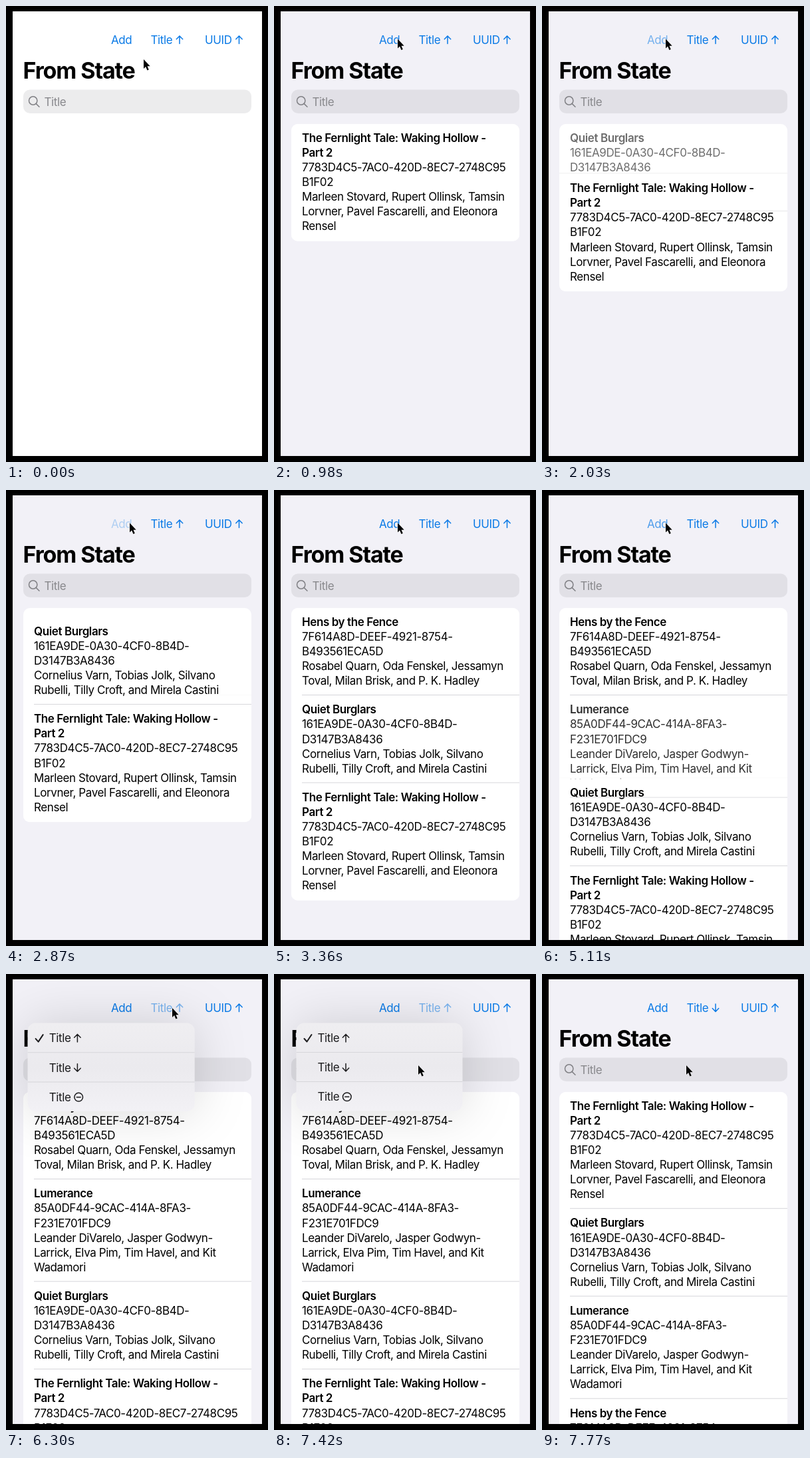
An HTML page that plays this animation: 394 by 684 pixels, repeating every 8000 ms.

```html
<!DOCTYPE html>
<html lang="en">
<head>
<meta charset="utf-8">
<title>Sortable list</title>
<style>
  html, body { margin: 0; width: 100%; height: 100%; overflow: hidden; background: #000; }
  svg { display: block; width: 394px; height: 684px; }
  text { font: 17px Inter, "Liberation Sans", sans-serif; letter-spacing: -.41px; font-optical-sizing: none; white-space: pre; }
  .heading { font-size: 34px; font-weight: 700; letter-spacing: -1.1px; }
  .name { font-weight: 600; }
  .hint { fill: #88888c; }
  .icon { fill: none; stroke: currentColor; stroke-width: 1.5; stroke-linecap: round; stroke-linejoin: round; }
  .label { fill: currentColor; }
  #bar { color: #0a7ae6; }
  #menu { color: #1c1c1e; }
  .panel { filter: drop-shadow(0 0 38px rgba(0, 0, 0, .15)); }
  .rule { stroke: #d6d6da; }
</style>
</head>
<body>
<svg viewBox="0 0 394 684">
  <defs>
    <clipPath id="screenClip"><rect x="10" y="8" width="375" height="667"/></clipPath>
    <clipPath id="cardClip"><rect class="card" x="26" y="177" width="343" rx="10"/></clipPath>
    <linearGradient id="glass" x2="0" y2="1">
      <stop stop-color="#efeef1"/><stop offset=".5" stop-color="#ebeaee"/><stop offset="1" stop-color="#f2f1f5"/>
    </linearGradient>
  </defs>
  <g clip-path="url(#screenClip)">
    <rect width="394" height="684" fill="#fff"/>
    <rect id="tint" width="394" height="684" fill="#f2f1f7"/>
    <text class="heading" x="25.5" y="108.5">From State</text>
    <rect x="26" y="125.5" width="343" height="35.5" rx="10" fill="#767680" fill-opacity=".14"/>
    <g class="icon" color="#808085"><circle cx="40.7" cy="142" r="6.2"/><path d="M45.3 146.6l4.7 4.6"/></g>
    <text class="hint" x="57.5" y="150">Title</text>
    <g id="list" clip-path="url(#cardClip)">
      <rect class="card" x="26" y="177" width="343" fill="#fff"/>
      <g id="rows"></g>
      <g id="rules"></g>
    </g>
    <g id="bar"></g>
    <g id="menu">
      <rect class="panel" x="33.5" y="73.5" width="250" height="132" rx="12" fill="url(#glass)"/>
      <path class="rule" d="M33.5 117.5h250M33.5 161.5h250"/>
      <path class="icon" style="stroke-width:2" d="M45.5 97l4 4.5 7-10.5"/>
    </g>
    <circle id="ring" r="22" fill="none" stroke="#000" stroke-width="2" stroke-opacity=".8"/>
    <path id="cursor" d="M0 0v14l3.1-2.9 2.3 5.3 2.4-1-2.3-5.2h4.2z" fill="#000" stroke="#fff" stroke-width="1" paint-order="stroke"/>
  </g>
</svg>
<script>
const LOOP = 8000, LINE = 22.1, PAD = 21, TOP = 177;
const MENU_OPEN = 5985, PICK = 7560;

// Ascending by title; `born` is when the row starts to appear.
const rows = [
  { born: 2783, name: ["Hens by the Fence"],
    rest: ["7F614A8D-DEEF-4921-8754-", "B493561ECA5D", "Rosabel Quarn, Oda Fenskel, Jessamyn", "Toval, Milan Brisk, and P. K. Hadley"] },
  { born: 4813, name: ["Lumerance"],
    rest: ["85A0DF44-9CAC-414A-8FA3-", "F231E701FDC9", "Leander DiVarelo, Jasper Godwyn-", "Larrick, Elva Pim, Tim Havel, and Kit", "Wadamori"] },
  { born: 1803, name: ["Quiet Burglars"],
    rest: ["161EA9DE-0A30-4CF0-8B4D-", "D3147B3A8436", "Cornelius Varn, Tobias Jolk, Silvano", "Rubelli, Tilly Croft, and Mirela Castini"] },
  { born: 543, name: ["The Fernlight Tale: Waking Hollow -", "Part 2"],
    rest: ["7783D4C5-7AC0-420D-8EC7-2748C95", "B1F02", "Marleen Stovard, Rupert Ollinsk, Tamsin", "Lorvner, Pavel Fascarelli, and Eleonora", "Rensel"] },
];
const reversed = [...rows].reverse();

// [down, up, x, y]
const clicks = [
  [490, 560, 185, 50.5], [1680, 1820, 185, 50.5], [2730, 2800, 185, 50.5],
  [4760, 4830, 185, 50.5], [5950, 6020, 250, 51.5], [7490, PICK, 217, 137.5],
];
const addClicks = clicks.slice(0, 4);

// [start, end, x, y]
const moves = [[190, 455, 186, 49.5], [5490, 5810, 250, 51], [6960, 7390, 217, 137]];

const $ = id => document.getElementById(id);
const span = (t, a, b) => Math.min(1, Math.max(0, (t - a) / (b - a)));
const ease = x => (1 - Math.cos(Math.PI * x)) / 2;
const mix = (a, b, k) => a + (b - a) * k;

function add(parent, tag, attrs, content = "") {
  const el = document.createElementNS("http://www.w3.org/2000/svg", tag);
  for (const key in attrs) el.setAttribute(key, attrs[key]);
  el.innerHTML = content;
  return parent.appendChild(el);
}

const shapes = {
  up: "M5.5 11.5V0M.8 4.8L5.5 0l4.7 4.8",
  down: "M5.5 0v11.5M.8 6.7l4.7 4.8 4.7-4.8",
  none: "M1 5.8a6.3 6.3 0 1 0 12.6 0a6.3 6.3 0 1 0-12.6 0M4.3 5.8h6",
};

function label(parent, x, y, text, shape, gap = 38) {
  const g = add(parent, "g", { transform: `translate(${x} ${y})` });
  add(g, "text", { class: "label", y: 6.2 }, text);
  if (shape) g.icon = add(g, "path", { class: "icon", d: shapes[shape], transform: `translate(${gap} -5.6)` });
  return g;
}

const addButton = label($("bar"), 158, 50.5, "Add");
const titleButton = label($("bar"), 217.5, 50.5, "Title", "up");
label($("bar"), 299, 50.5, "UUID", "up", 46);
["up", "down", "none"].forEach((shape, i) => label($("menu"), 65.5, 96 + 44 * i, "Title", shape, 37));

for (const row of rows) {
  const lines = [...row.name, ...row.rest];
  row.height = lines.length * LINE + PAD;
  row.el = add($("rows"), "g", {});
  add(row.el, "rect", { x: 26, width: 343, height: row.height, fill: "#fff" });
  row.edge = add(row.el, "path", { d: "M26 -1.5h343", stroke: "#000" });
  lines.forEach((line, i) =>
    add(row.el, "text", { x: 42, y: 26.8 + i * LINE, class: i < row.name.length ? "name" : "" }, line));
  row.rule = add($("rules"), "path", { class: "rule", d: `M42 ${row.height - 1}h327` });
}

function drawList(t) {
  const order = t < PICK ? rows : reversed;
  const last = order.length - 1;
  let y = TOP, above = 0;
  order.forEach((row, i) => {
    const shown = ease(span(t, row.born, row.born + 417));
    const place = `translate(0 ${y})`;
    row.el.setAttribute("transform", place);
    row.rule.setAttribute("transform", place);
    row.el.style.opacity = shown;
    row.rule.style.opacity = i < last ? shown : 0;
    row.edge.style.opacity = .6 * above * (1 - above) ** 2;
    y += row.height * (i < last ? shown : 1);
    above = shown;
  });
  document.querySelectorAll(".card").forEach(el => el.setAttribute("height", y - TOP));
  const first = rows[3].born;
  $("list").style.opacity = $("tint").style.opacity = ease(span(t, first, first + 417));
}

function drawBar(t) {
  let strength = 1;
  for (const [down, up] of addClicks)
    if (t >= down) strength = mix(.25, 1, ease(span(t, up, up + 500)));
  addButton.style.opacity = strength;
  titleButton.style.opacity = t < 5950 ? 1 : mix(.52, 1, span(t, PICK, PICK + 190));
  titleButton.icon.setAttribute("d", t < PICK ? shapes.up : shapes.down);
}

function drawMenu(t) {
  const s = Math.max(0, t - MENU_OPEN) / 1000;
  const closing = span(t, PICK - 30, PICK + 190);
  const scale = (1 - Math.exp(-17 * s) * Math.cos(9 * s)) * (1 - .5 * closing * closing);
  $("menu").style.opacity = span(t, MENU_OPEN, MENU_OPEN + 140) * (1 - closing);
  $("menu").setAttribute("transform", `translate(243 73) scale(${scale}) translate(-243 -73)`);
}

function drawPointer(t) {
  let x = 207, y = 80;
  for (const [start, end, toX, toY] of moves) {
    const k = ease(span(t, start, end));
    x = mix(x, toX, k);
    y = mix(y, toY, k);
  }
  $("cursor").setAttribute("transform", `translate(${x} ${y})`);
  const click = clicks.find(([down, up]) => t >= down && t < up);
  $("ring").style.display = click ? "" : "none";
  if (click) $("ring").setAttribute("transform", `translate(${click[2]} ${click[3]})`);
}

function frame() {
  const t = performance.now() % LOOP;
  drawList(t);
  drawBar(t);
  drawMenu(t);
  drawPointer(t);
  requestAnimationFrame(frame);
}
frame();
</script>
</body>
</html>
```
